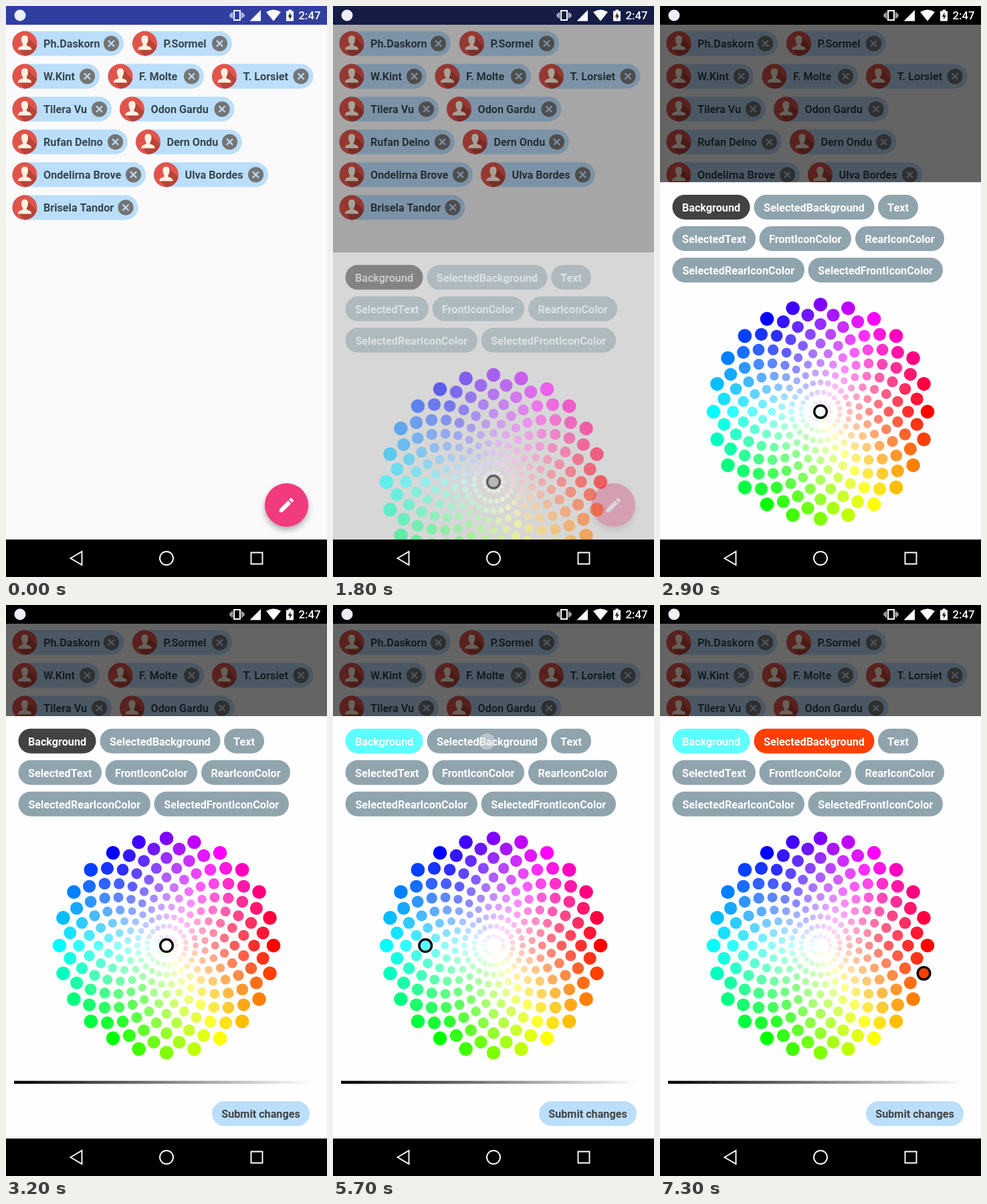
Animation of 480x853 px, one loop 8 s. Source, as an HTML page with a canvas:

```html
<!DOCTYPE html>
<html lang="en">
<head>
<meta charset="utf-8">
<title>Chips and colour wheel</title>
<style>
  html, body { margin: 0; width: 100%; height: 100%; overflow: hidden; background: #000; }
  canvas { display: block; width: 480px; height: 853px; }
</style>
</head>
<body>
<canvas id="stage"></canvas>
<script>
const W = 480, H = 853, NAV_TOP = 797, LOOP = 8000, TAU = Math.PI * 2;
const PEEK_TOP = 298, DRAG = 132, WHEEL_Y = 342.8;
const canvas = document.getElementById('stage');
const ratio = window.devicePixelRatio || 1;
canvas.width = W * ratio;
canvas.height = H * ratio;
const ctx = canvas.getContext('2d');
ctx.scale(ratio, ratio);

const BLUE = '#bbdefb', SLATE = '#90a4ae', DARK = '#424242', INK = '#37474f';
const CYAN = '#5dffff', ORANGE = '#ff4000';

// [left, right, label] per row
const people = [
  [[9, 176, 'Ph.Daskorn'], [188.5, 338, 'P.Sormel']],
  [[9, 140, 'W.Kint'], [152, 296, 'F. Molte'], [307.5, 459.5, 'T. Lorsiet']],
  [[9, 158, 'Tilera Vu'], [169.5, 341.5, 'Odon Gardu']],
  [[9, 182, 'Rufan Delno'], [193.5, 353, 'Dern Ondu']],
  [[9, 209, 'Ondelirna Brove'], [220.5, 392, 'Ulva Bordes']],
  [[9, 197.5, 'Brisela Tandor']]
];
const options = [
  [[18.5, 134.5, 'Background'], [140.5, 320.5, 'SelectedBackground'], [326, 386, 'Text']],
  [[18.5, 143, 'SelectedText'], [148.5, 286, 'FrontIconColor'], [292, 425, 'RearIconColor']],
  [[18.5, 216, 'SelectedRearIconColor'], [221.5, 423, 'SelectedFrontIconColor']]
];
// [time, x, y]
const taps = [[1300, 431, 746], [4200, 138, 509], [5700, 230, 204], [7000, 394.5, 550]];
const TAP_LENGTH = 150;

const progress = (t, from, to) => Math.min(1, Math.max(0, (t - from) / (to - from)));
const easeOut = p => 1 - (1 - p) ** 2;
const smooth = p => p * p * (3 - 2 * p);

function rect(x, y, w, h, color) {
  ctx.fillStyle = color;
  ctx.fillRect(x, y, w, h);
}
function disc(x, y, r, color) {
  ctx.fillStyle = color;
  ctx.beginPath();
  ctx.arc(x, y, r, 0, TAU);
  ctx.fill();
}
function fillPath(d, color) {
  ctx.fillStyle = color;
  ctx.fill(new Path2D(d));
}
function strokePath(d, color, width) {
  ctx.strokeStyle = color;
  ctx.lineWidth = width;
  ctx.stroke(new Path2D(d));
}
function at(x, y, draw) {
  ctx.save();
  ctx.translate(x, y);
  draw();
  ctx.restore();
}
function pill(left, right, y, color) {
  ctx.fillStyle = color;
  ctx.beginPath();
  ctx.arc(left + 18.5, y, 18.5, Math.PI / 2, -Math.PI / 2);
  ctx.arc(right - 18.5, y, 18.5, -Math.PI / 2, Math.PI / 2);
  ctx.fill();
}
function label(text, x, y, color, align = 'left', font = 'bold 16.2px Roboto, sans-serif') {
  ctx.font = font;
  ctx.textAlign = align;
  ctx.fillStyle = color;
  ctx.fillText(text, x, y);
}
function textPill([left, right, text], y, fill, ink) {
  pill(left, right, y, fill);
  label(text, (left + right) / 2, y + 6.3, ink, 'center');
}

function avatar() {
  disc(0, 0, 18.5, '#e2544b');
  ctx.clip();
  fillPath('M4-10L24 10V30H10L-9 9L0 0Z', '#b8443a');
  fillPath('M0-12C4-12 5.5-9 5-5C4.7-2 3.5 0 2.8 1V3C6 4.5 10 4.5 10 9.5H-10' +
    'C-10 4.5-6 4.5-2.8 3V1C-3.5 0-4.7-2-5-5C-5.5-9-4-12 0-12Z', '#fff3e0');
}
function personChip([left, right, name], y) {
  pill(left, right, y, BLUE);
  at(left + 19, y, avatar);
  label(name, left + 47, y + 6.3, INK);
  at(right - 18.5, y, () => {
    disc(0, 0, 11.6, '#757575');
    strokePath('M-4.5-4.5L4.5 4.5M4.5-4.5L-4.5 4.5', BLUE, 2.2);
  });
}

function actionButton() {
  ctx.save();
  ctx.shadowColor = 'rgba(0,0,0,.3)';
  ctx.shadowBlur = 9 * ratio;
  ctx.shadowOffsetY = 5 * ratio;
  disc(419.5, 745.5, 32.6, '#f23b7f');
  ctx.restore();
  at(405.3, 731.4, () => {
    ctx.scale(1.18, 1.18);
    fillPath('M3 17.25V21H6.75L17.81 9.94L14.06 6.19ZM20.71 7.04a1 1 0 0 0 0-1.41' +
      'l-2.34-2.34a1 1 0 0 0-1.41 0l-1.83 1.83 3.75 3.75Z', '#fff');
  });
}

// Full-brightness HSV to CSS colour.
function hsv(hue, saturation) {
  const channel = n => {
    const k = (n + hue / 60) % 6;
    return Math.round(255 * (1 - saturation * Math.max(0, Math.min(k, 4 - k, 1))));
  };
  return `rgb(${channel(5)},${channel(3)},${channel(1)})`;
}
function colorWheel(cx, cy) {
  const rings = 12, maxRadius = 160, base = maxRadius / (rings - 1) / 2;
  for (let i = 1; i < rings; i++) {
    const saturation = i / (rings - 1), radius = maxRadius * saturation;
    const size = base * (1 + 1.2 * (i / rings - 0.5));
    const fit = Math.floor(0.975 * Math.PI / Math.asin(size / radius) + 0.5);
    const count = Math.min(fit, rings * 2);
    for (let j = 0; j < count; j++) {
      const angle = TAU * (j + ((i + 1) % 2) / 2) / count;
      disc(cx + radius * Math.cos(angle), cy + radius * Math.sin(angle),
        size - 0.6, hsv(angle * 360 / TAU, saturation));
    }
  }
}

function sheet(t) {
  rect(0, 0, W, NAV_TOP, '#fefefe');
  const first = t < 4300 ? DARK : CYAN;
  const second = t < 5800 ? SLATE : t < 7100 ? DARK : ORANGE;
  options.forEach((row, r) => row.forEach((chip, c) => {
    const fill = r || c > 1 ? SLATE : c ? second : first;
    textPill(chip, 37.2 + r * 47, fill, '#fff');
  }));

  colorWheel(240, WHEEL_Y);
  let [x, y, color] = [240, WHEEL_Y, '#fff'];
  if (t >= 4200 && t < 5800) [x, color] = [138.2, CYAN];
  if (t >= 7000) [x, y, color] = [394.5, WHEEL_Y + 41.4, ORANGE];
  disc(x, y, 11, '#000');
  disc(x, y, 7.6, color);

  const shade = ctx.createLinearGradient(12, 0, 456, 0);
  shade.addColorStop(0, '#000');
  shade.addColorStop(1, '#fff');
  rect(12, 544.8, 444, 4.5, shade);
  textPill([308, 454, 'Submit changes'], 593.8, BLUE, DARK);
}

function statusIcons() {
  disc(21, 14, 8.5, '#eceef8');
  strokePath('M341 7H350V21H341Z', '#fff', 2);
  strokePath('M338 9.5V18.5M335.5 11.5V16.5M353 9.5V18.5M355.5 11.5V16.5', '#fff', 1.5);
  fillPath('M381 6V22.5H364.5Z', '#fff');
  fillPath('M400 22.5L389 9Q400 2 411 9Z', '#fff');
  fillPath('M422.5 5.5H427V7.5H430V22.5H419V7.5H422.5Z', '#fff');
  fillPath('M425.5 9.5L421.5 16H424V20.5L428 14H425.5Z', '#303030');
  label('2:47', 470.5, 20.2, '#fff', 'right', '500 16.8px Roboto, sans-serif');
}
function navigationBar() {
  rect(0, NAV_TOP, W, H - NAV_TOP, '#000');
  strokePath('M96.5 825L113.5 815V835Z', '#fff', 1.9);
  strokePath('M250 825A10 10 0 1 1 230 825A10 10 0 1 1 250 825Z', '#fff', 1.9);
  strokePath('M366.5 816.5H383.5V833.5H366.5Z', '#fff', 1.9);
}

function draw(t) {
  // The dialog fades in while rising by a fifth of its window.
  const show = easeOut(progress(t, 1700, 2000));
  const drag = smooth(progress(t, 2800, 3100));
  const sheetTop = PEEK_TOP + (1 - show) * NAV_TOP / 5 - DRAG * drag;

  rect(0, 0, W, H, '#fafafa');
  people.forEach((row, r) => row.forEach(chip => personChip(chip, 56 + r * 49)));
  actionButton();
  rect(0, 28, W, NAV_TOP - 28, `rgba(0,0,0,${0.6 * show})`);
  if (show > 0) {
    at(0, sheetTop, () => {
      ctx.globalAlpha = show;
      sheet(t);
    });
  }

  for (const [start, x, y] of taps) {
    if (t >= start && t < start + TAP_LENGTH) disc(x, y, 12.3, 'rgba(228,228,228,.5)');
  }
  rect(0, 0, W, 28, '#303f9f');
  rect(0, 0, W, 28, `rgba(0,0,0,${show})`);
  statusIcons();
  navigationBar();
}

function tick() {
  draw(performance.now() % LOOP);
  requestAnimationFrame(tick);
}
tick();
</script>
</body>
</html>
```
